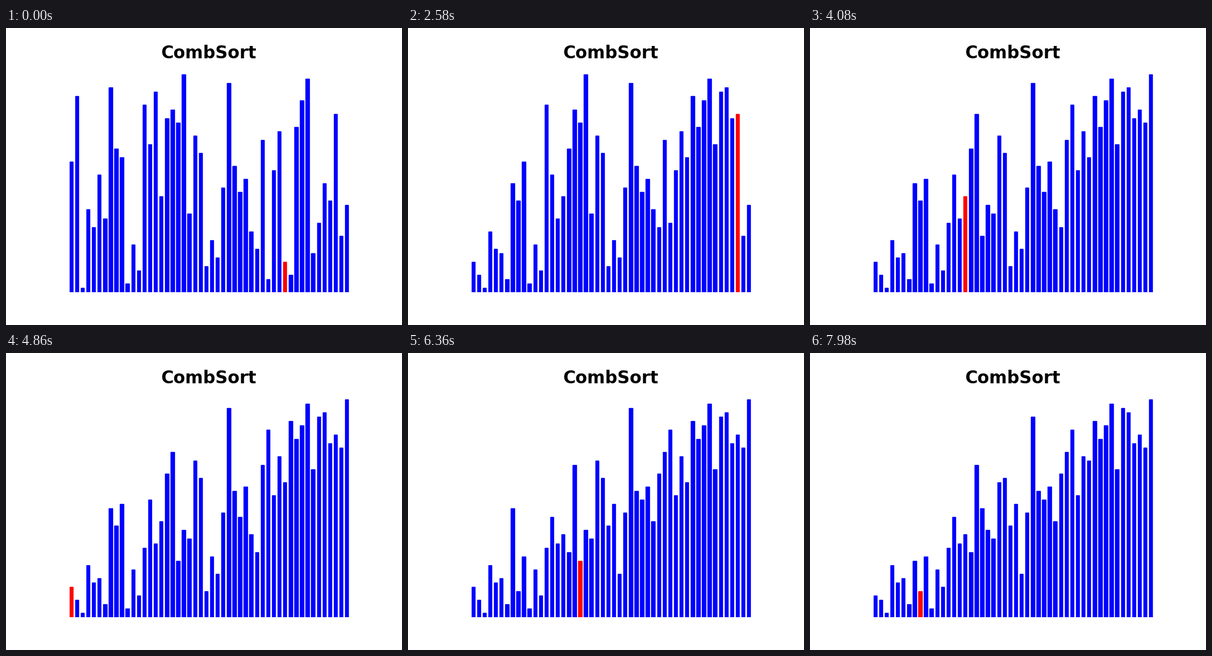
Recreate the animation shown at these times as a matplotlib script. Size 640 by 480 pixels, loop 8 s.

```python
import matplotlib.pyplot as plt
from matplotlib.animation import FuncAnimation

STEP_MS = 60
TICK_MS = 20
LOOP_MS = 8000
SHRINK = 1.3

# The shuffled input; every later state follows from sorting it.
START = [
    30, 45, 1, 19, 15, 27, 17, 47, 33, 31, 2, 11, 5, 43, 34, 46, 22,
    40, 42, 39, 50, 18, 36, 32, 6, 12, 8, 24, 48, 29, 23, 26, 14, 10,
    35, 3, 28, 37, 7, 4, 38, 44, 49, 9, 16, 25, 21, 41, 13, 20,
]


def comb_sort(values):
    """Yield (values, marked index) for each comparison and before each swap."""
    a = list(values)
    gap = len(a)
    swapped = True
    while gap > 1 or swapped:
        gap = max(1, int(gap / SHRINK))
        swapped = False
        for i in range(len(a) - gap):
            j = i + gap
            yield a[:], i
            if a[i] > a[j]:
                yield a[:], j
                a[i], a[j] = a[j], a[i]
                swapped = True


# The loop opens on the first swap, just after the first comparison.
steps = list(comb_sort(START))[1:]

fig, ax = plt.subplots(figsize=(6.4, 4.8), dpi=100, facecolor="white")
bars = ax.bar(range(len(START)), START, width=0.6, linewidth=1)
ax.set_title("CombSort", fontsize=20, fontweight="bold", family="DejaVu Sans")
ax.axis("off")


def draw(tick):
    heights, marked = steps[tick * TICK_MS // STEP_MS]
    for i, (bar, height) in enumerate(zip(bars, heights)):
        bar.set_height(height)
        bar.set_color("red" if i == marked else "blue")  # fill and outline
    return list(bars)


anim = FuncAnimation(fig, draw, frames=LOOP_MS // TICK_MS, interval=TICK_MS,
                     init_func=lambda: draw(0), repeat=True, repeat_delay=0)
plt.show()
```
